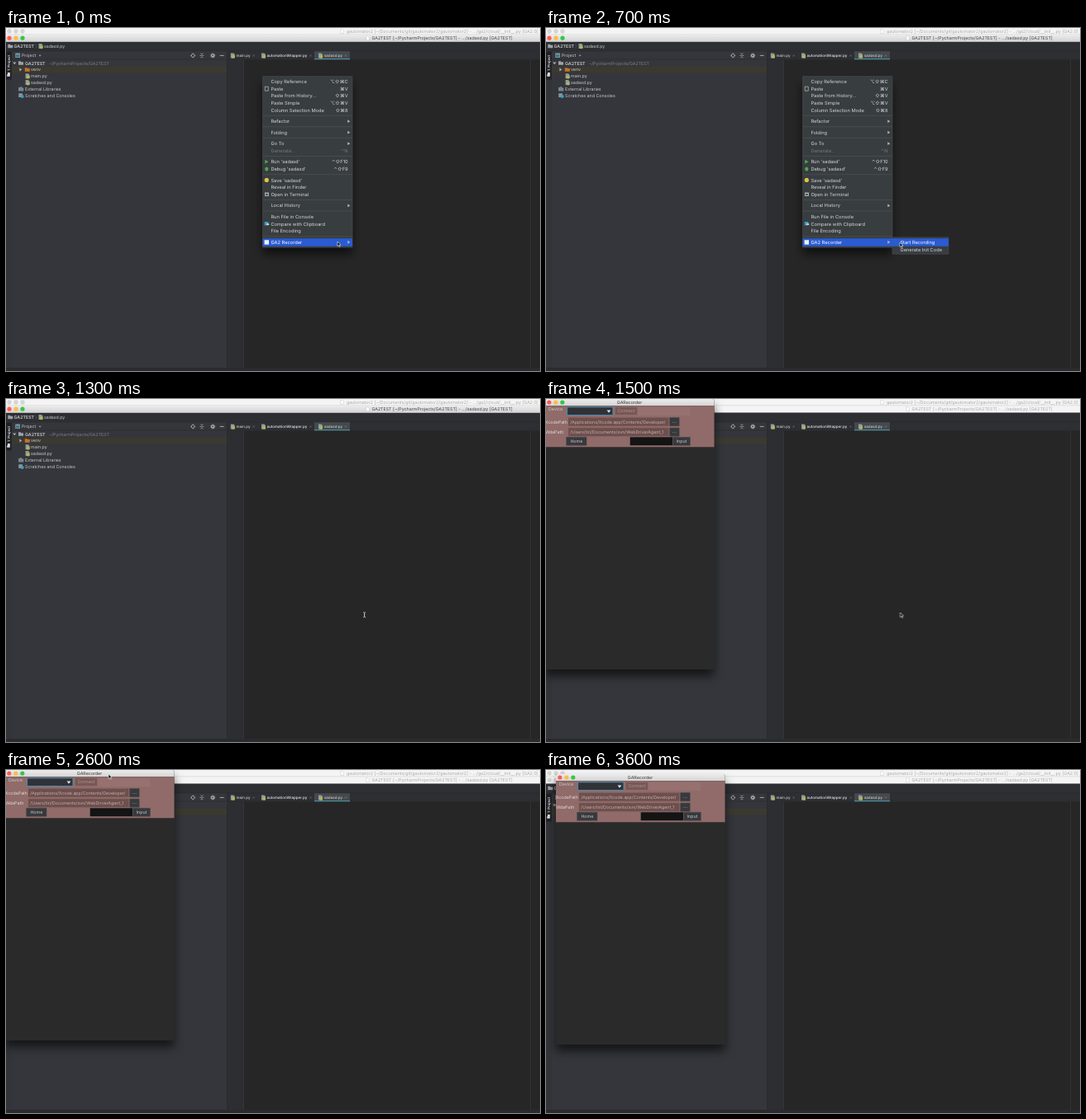
An HTML page for the animation above (4500 ms loop, 646x416 px).

```html
<!DOCTYPE html>
<html lang="en">
<head>
<meta charset="utf-8">
<title>GA2 Recorder</title>
<style>
html, body { margin: 0; width: 100%; height: 100%; overflow: hidden; background: #262626; }
svg { display: block; }
text { font: 5.3px Inter, "DejaVu Sans", sans-serif; fill: #c8cacc; text-rendering: geometricPrecision; white-space: pre; }
.bold { font-weight: 600; }
.tab text { font-size: 4.5px; font-weight: 500; }
.menu text { font-size: 5.72px; fill: #d6d7d9; }
.menu .off { fill: #77797c; }
.menu .on { fill: #fff; }
.back text { fill: #aaa; }
.end { text-anchor: end; }
.mid { text-anchor: middle; }

/* Scenes switch hard; the cursor moves ten times a second. */
.scene { animation: 4.5s step-end infinite; visibility: hidden; }
#focus { animation-name: focus; }
#menu { animation-name: menu; }
#sub { animation-name: sub; }
#beam { animation-name: beam; }
#arrow { animation-name: arrow; }
#ring { animation-name: ring; }
#win { animation-name: win; }

@keyframes focus { 0% { visibility: visible } 31.1%, 100% { visibility: hidden } }
@keyframes menu { 0% { visibility: visible } 26.6%, 100% { visibility: hidden } }
@keyframes sub { 0% { visibility: hidden } 6.6% { visibility: visible } 26.6%, 100% { visibility: hidden } }
@keyframes beam { 0% { visibility: hidden } 26.6% { visibility: visible } 33.3%, 100% { visibility: hidden } }
@keyframes ring {
  0% { visibility: hidden } 17.7% { visibility: visible } 19.9% { visibility: hidden }
  59.9% { visibility: visible } 64.4%, 100% { visibility: hidden }
}
@keyframes win {
  0% { visibility: hidden; transform: translate(-1px, 0) }
  31.1% { visibility: visible; transform: translate(-1px, 0) }
  59.9% { visibility: visible; transform: translate(5.5px, 2.5px) }
  62.2%, 100% { visibility: visible; transform: translate(12px, 5px) }
}
@keyframes arrow {
  0% { visibility: visible; transform: translate(401px, 259px); animation-timing-function: steps(6) }
  13.3% { visibility: visible; transform: translate(404px, 259.5px) }
  15.5% { visibility: visible; transform: translate(428px, 260px) }
  17.7% { visibility: visible; transform: translate(431px, 260px) }
  26.6% { visibility: hidden; transform: translate(431px, 260px) }
  33.3% { visibility: visible; transform: translate(428.5px, 259px); animation-timing-function: steps(2) }
  37.7% { visibility: visible; transform: translate(385px, 208px); animation-timing-function: steps(6) }
  51.1% { visibility: visible; transform: translate(134px, 12px); animation-timing-function: steps(3) }
  57.7% { visibility: visible; transform: translate(124px, 5px) }
  59.9% { visibility: visible; transform: translate(130.5px, 8px) }
  62.2% { visibility: visible; transform: translate(137px, 10.8px) }
  66.6% { visibility: visible; transform: translate(137px, 10.8px); animation-timing-function: steps(3) }
  73.3%, 100% { visibility: hidden; transform: translate(150px, -8px) }
}
</style>
</head>
<body>
<svg width="646" height="416" viewBox="0 0 646 416">
  <defs>
    <linearGradient id="bar" x2="0" y2="1">
      <stop stop-color="#ececec"/><stop offset="1" stop-color="#d4d4d4"/>
    </linearGradient>
    <clipPath id="frame"><path id="body" d="M0 328V2q0-2 2-2H202.5q2 0 2 2V328z"/></clipPath>
    <filter id="shadow" x="-20%" y="-20%" width="140%" height="140%">
      <feDropShadow dx="0" dy="8" stdDeviation="6" flood-opacity=".6"/>
    </filter>
    <g id="py">
      <path d="M-2-3H1.4L3-1.4V3H-2z" fill="#8d9ca4"/>
      <circle cx="1.1" cy="1.3" r="2" fill="#b5b552"/>
    </g>
    <path id="dir" d="M-3-2.2H-.4L.4-1.3H3V2.3H-3z"/>
    <path id="cross" d="M-1-1 1 1M1-1-1 1" stroke="#85888b" stroke-width=".5"/>
    <g id="lamps">
      <circle r="2.6" fill="#fc5b57"/><circle cx="8" r="2.6" fill="#fdbc40"/><circle cx="16" r="2.6" fill="#35c649"/>
    </g>
    <g id="dull" fill="#d6d6d6" stroke="#c6c6c6" stroke-width=".4">
      <circle r="2.4"/><circle cx="8" r="2.4"/><circle cx="16" r="2.4"/>
    </g>
    <path id="page" d="M-1.6-2.5H.6L1.8-1.3V2.5H-1.6z" fill="#fff" stroke="#b5b5b5" stroke-width=".4"/>
  </defs>

  <!-- navigation, side strip and panels -->
  <path d="M0 16H646V416H0z" fill="#2d2f33"/>
  <path d="M7 28H267V412H7z" fill="#34363b"/>
  <path d="M0 62.5H7V412H0z" fill="#323438"/>
  <path d="M267 38H288V412H267z" fill="#2d2e32"/>
  <path d="M288 38.5H646V412H288z" fill="#262626"/>
  <path d="M0 28H646M7 38H646M267.5 28V412" stroke="#292b2e" stroke-width=".6" fill="none"/>
  <path d="M287.5 38.5V412M634.5 38.5V412" stroke="#3a3b3d" stroke-width=".6"/>
  <path d="M0 29H6.5V62.5H0z" fill="#1f2124"/>
  <text transform="translate(4.8 52)rotate(-90)" class="bold" style="font-size:4.3px;fill:#ececec">1: Project</text>
  <use href="#dir" transform="translate(3 56.3)rotate(-90)scale(.8)" fill="#dcdfe1"/>

  <use href="#dir" x="5.3" y="22" fill="#9aa3aa"/>
  <text x="9.5" y="24" class="bold">GA2TEST</text>
  <path d="M35.2 19.5 36.8 22 35.2 24.5" fill="none" stroke="#606366" stroke-width=".5"/>
  <use href="#py" x="41.5" y="22"/>
  <text x="46" y="24" style="font-size:5.2px">sadasd.py</text>

  <path d="M11.3 30.5H17V36H11.3z" fill="#8d979e"/>
  <path d="M12 32.2H16.3V35.3H12z" fill="#35798c"/>
  <text x="19" y="35.4" style="font-size:5.2px">Project</text>
  <path d="M39.6 32.7H42.6L41.1 34.6z" fill="#a8abae"/>
  <g fill="none" stroke="#b2b5b8" stroke-width=".7">
    <circle cx="226.2" cy="33.4" r="2"/>
    <path d="M226.2 30.4V32M226.2 34.8V36.4M223.2 33.4H224.8M227.6 33.4H229.2"/>
    <path d="M234.4 33.4H239.4M235.5 30.5 236.9 32 238.3 30.5M235.5 36.3 236.9 34.8 238.3 36.3"/>
    <circle cx="250.2" cy="33.4" r="1.6" stroke-width="1.3"/>
    <circle cx="250.2" cy="33.4" r="2.6" stroke-dasharray="1 1.04"/>
    <path d="M258.8 33.4H263.6" stroke-width=".9"/>
  </g>

  <!-- title bars -->
  <g class="back">
    <path d="M0 0H646V16.5H0z" fill="#f4f4f4"/>
    <path d="M0 7.8H646" stroke="#cfcfcf" stroke-width=".6"/>
    <use href="#dull" x="4" y="4"/><use href="#dull" x="4" y="12.2"/>
    <use href="#page" x="406.5" y="4"/><use href="#page" x="437.5" y="12.2"/>
    <text x="412" y="6">gautomator2 [~/Documents/git/gautomator2/gautomator2] - .../ga2/cloud/__init__.py [GA2.0]</text>
    <text x="442.4" y="14.1">GA2TEST [~/PycharmProjects/GA2TEST] - .../sadasd.py [GA2TEST]</text>
  </g>
  <g id="focus" class="scene">
    <path d="M0 8H646V16.5H0z" fill="url(#bar)"/>
    <use href="#lamps" x="4" y="12.2"/>
    <use href="#page" x="437.5" y="12.2"/>
    <text x="442.4" y="14.1" style="fill:#444">GA2TEST [~/PycharmProjects/GA2TEST] - .../sadasd.py [GA2TEST]</text>
  </g>

  <!-- project tree -->
  <path d="M7 46.5H267V54.4H7z" fill="#3c3930"/>
  <path d="M8.2 41.4H12.4L10.3 44.3z" fill="#a8abae"/>
  <path d="M16.4 48.3V52.5L19.3 50.4z" fill="#a8abae"/>
  <use href="#dir" x="18" y="42.5" fill="#9aa3aa"/>
  <use href="#dir" x="25.8" y="50.4" fill="#c7702f"/>
  <use href="#py" x="25.6" y="58.3"/><use href="#py" x="25.6" y="66.1"/>
  <path d="M15.3 72H16.8V76.5H15.3zM17.4 71.2H18.9V76.5H17.4zM19.5 72.5H21V76.5H19.5z" fill="#8fa3ad"/>
  <path d="M15.3 79.3H20V84H15.3z" fill="#8d979e"/><circle cx="19.6" cy="83" r="2.1" fill="#3f9cc0"/>
  <text x="23" y="44.5" class="bold">GA2TEST</text>
  <text x="51.7" y="44.5" style="fill:#7d8084;font-size:5.25px">~/PycharmProjects/GA2TEST</text>
  <text x="30" y="52.4">venv</text>
  <text x="30" y="60.2">main.py</text>
  <text x="30" y="68">sadasd.py</text>
  <text x="23" y="75.8">External Libraries</text>
  <text x="23" y="83.8">Scratches and Consoles</text>

  <!-- editor tabs -->
  <g class="tab">
    <path d="M373 28.3H416V38H373z" fill="#44494d"/>
    <path d="M373 37.6H416" stroke="#4b8a99" stroke-width="1.1"/>
    <use href="#py" x="273.8" y="33.4"/><use href="#py" x="311" y="33.4"/><use href="#py" x="380" y="33.4"/>
    <text x="278.5" y="35.1">main.py</text>
    <text x="315.5" y="35.1" style="fill:#e6e7e8">automationWrapper.py</text>
    <text x="384.9" y="35.1">sadasd.py</text>
    <use href="#cross" x="299.6" y="33.5"/><use href="#cross" x="368.6" y="33.5"/><use href="#cross" x="411" y="33.5"/>
  </g>
  <path d="M0 412H646V416H0z" fill="#2a2b2e"/>

  <!-- context menu; rows are added below -->
  <g id="menu" class="scene menu">
    <path d="M310.5 58.5H419V266H310.5z" fill="#393c40" stroke="#4a4d50" stroke-width=".5" filter="url(#shadow)"/>
    <path d="M310.5 255.2H419V264.7H310.5z" fill="#2a5bd2"/>
    <path d="M313.3 71.2H317.3V76.2H313.3z" fill="none" stroke="#b0b3b6" stroke-width=".8"/>
    <path d="M313.3 159.8V164.8L317.5 162.3z" fill="#4ea64f"/>
    <ellipse cx="315.3" cy="171" rx="2.1" ry="2.6" fill="#4ea64f"/>
    <circle cx="315.3" cy="184.4" r="2.6" fill="#d9c542"/>
    <path d="M313 199.5H318V204H313z" fill="#a9adb0"/><path d="M313.9 201H317V203H313.9z" fill="#54585c"/>
    <path d="M312.7 235H317.4V239.4H312.7z" fill="#3f9cc0"/><path d="M315 237H318.2V239H315z" fill="#c5c8ca"/>
    <path d="M312.6 257.2H318V262.6H312.6z" fill="#e8f0f2"/>
  </g>
  <g id="sub" class="scene menu">
    <path d="M419 253.8H487V274.3H419z" fill="#393c40" stroke="#4a4d50" stroke-width=".5"/>
    <path d="M419 255.2H487V264.7H419z" fill="#2a5bd2"/>
    <text x="428.4" y="262" class="on">Start Recording</text>
    <text x="428.4" y="270.6">Generate Init Code</text>
  </g>

  <!-- recorder window -->
  <g id="win" class="scene">
    <use href="#body" fill="#2b2b2b" filter="url(#shadow)"/>
    <g clip-path="url(#frame)">
      <path d="M0 0H205V8.3H0z" fill="url(#bar)"/>
      <use href="#lamps" x="4.8" y="4"/>
      <text x="102" y="6" class="mid" style="fill:#333">GARecorder</text>
      <path d="M0 8.3H205V58.3H0z" fill="#906b69"/>
      <path d="M112 10H175.5V20H112z" fill="#967170"/>
      <text x="4" y="14.4">Device</text>
      <path d="M26.6 9.8H82V19.6H26.6z" fill="#303237" stroke="#4b8fb0" stroke-width="1"/>
      <path d="M74.6 13.5H79.4L77 16.7z" fill="#e4e4e4"/>
      <path d="M84.2 9.6H111.6V19.5H84.2z" fill="#785856" stroke="#9b7674" stroke-width=".5"/>
      <text x="98" y="16.4" class="mid" style="fill:#ad9492">Connect</text>
      <text x="27" y="29.8" class="end" style="fill:#dedada">XcodePath</text>
      <text x="22.3" y="42.1" class="end" style="fill:#dedada">WdaPath</text>
      <path d="M28 22.6H149.5V32.8H28zM28 35H149.5V45.2H28z" fill="#6d4f4d" stroke="#86625f" stroke-width=".4"/>
      <text x="30.3" y="29.6" style="fill:#c2b0ae">/Applications/Xcode.app/Contents/Developer/</text>
      <text x="30.3" y="42" style="fill:#c2b0ae">/Users/tiri/Documents/svn/WebDriverAgent_1</text>
      <g fill="#37393d" stroke="#484a4d" stroke-width=".5">
        <path d="M150.6 22.6H162.2V32.8H150.6zM150.6 35H162.2V45.2H150.6zM25.6 46.3H50V56.3H25.6zM154.6 46.3H175.4V56.3H154.6z"/>
      </g>
      <path d="M102.7 46.3H154V56.3H102.7z" fill="#141414"/>
      <text x="156.4" y="28.8" class="mid bold">...</text>
      <text x="156.4" y="41.2" class="mid bold">...</text>
      <text x="37.8" y="53.2" class="mid">Home</text>
      <text x="165" y="53.2" class="mid">Input</text>
    </g>
  </g>

  <!-- pointers -->
  <path id="beam" class="scene" d="M432 258.6Q433.6 258.6 433.6 259.6V263.8Q433.6 264.8 432 264.8M435.2 258.6Q433.6 258.6 433.6 259.6V263.8Q433.6 264.8 435.2 264.8" fill="none" stroke="#d8d8d8" stroke-width=".7"/>
  <g id="arrow" class="scene">
    <g id="ring" class="scene" fill="none">
      <circle r="7.5" stroke="#fff" stroke-opacity=".6" stroke-width=".8"/>
      <circle r="8.3" stroke="#0b0b0b" stroke-width="1.3"/>
    </g>
    <path d="M0 0V5.6L1.3 4.4 2.2 6.5 3.2 6.1 2.3 4H4.1z" fill="#0b0b0b" stroke="#f2f2f2" stroke-width=".6"/>
  </g>
</svg>
<script>
const menu = document.getElementById('menu');

function add(tag, attrs, label = '') {
  const node = document.createElementNS('http://www.w3.org/2000/svg', tag);
  for (const key in attrs) node.setAttribute(key, attrs[key]);
  node.textContent = label;
  menu.append(node);
}

// Label and shortcut; '>' opens a submenu, '-' is a separator.
const rows = [
  'Copy Reference|⌥⇧⌘C', 'Paste|⌘V', 'Paste from History...|⇧⌘V', 'Paste Simple|⌥⇧⌘V',
  'Column Selection Mode|⇧⌘8', '-', 'Refactor|>', '-', 'Folding|>', '-', 'Go To|>',
  'Generate...|⌃N', '-', "Run 'sadasd'|⌃⇧F10", "Debug 'sadasd'|⌃⇧F9", '-', "Save 'sadasd'",
  'Reveal in Finder', 'Open in Terminal', '-', 'Local History|>', '-', 'Run File in Console',
  'Compare with Clipboard', 'File Encoding', '-', 'GA2 Recorder|>'
];
let y = 65;
for (const row of rows) {
  if (row === '-') {
    add('path', { d: `M310.8 ${y - 2}H418.8`, stroke: '#54575a', 'stroke-width': .6 });
    y += 4.88;
    continue;
  }
  const [label, key] = row.split('|');
  const kind = label === 'Generate...' ? 'off' : label === 'GA2 Recorder' ? 'on' : '';
  add('text', { x: 320.4, y: y + 2, class: kind }, label);
  if (key === '>') add('path', { d: `M413.3 ${y - 1.9}v3.8l3-1.9z`, fill: '#b4b7ba' });
  else if (key) add('text', { x: 413.6, y: y + 2, class: 'end ' + kind }, key);
  y += 8.65;
}
</script>
</body>
</html>
```
